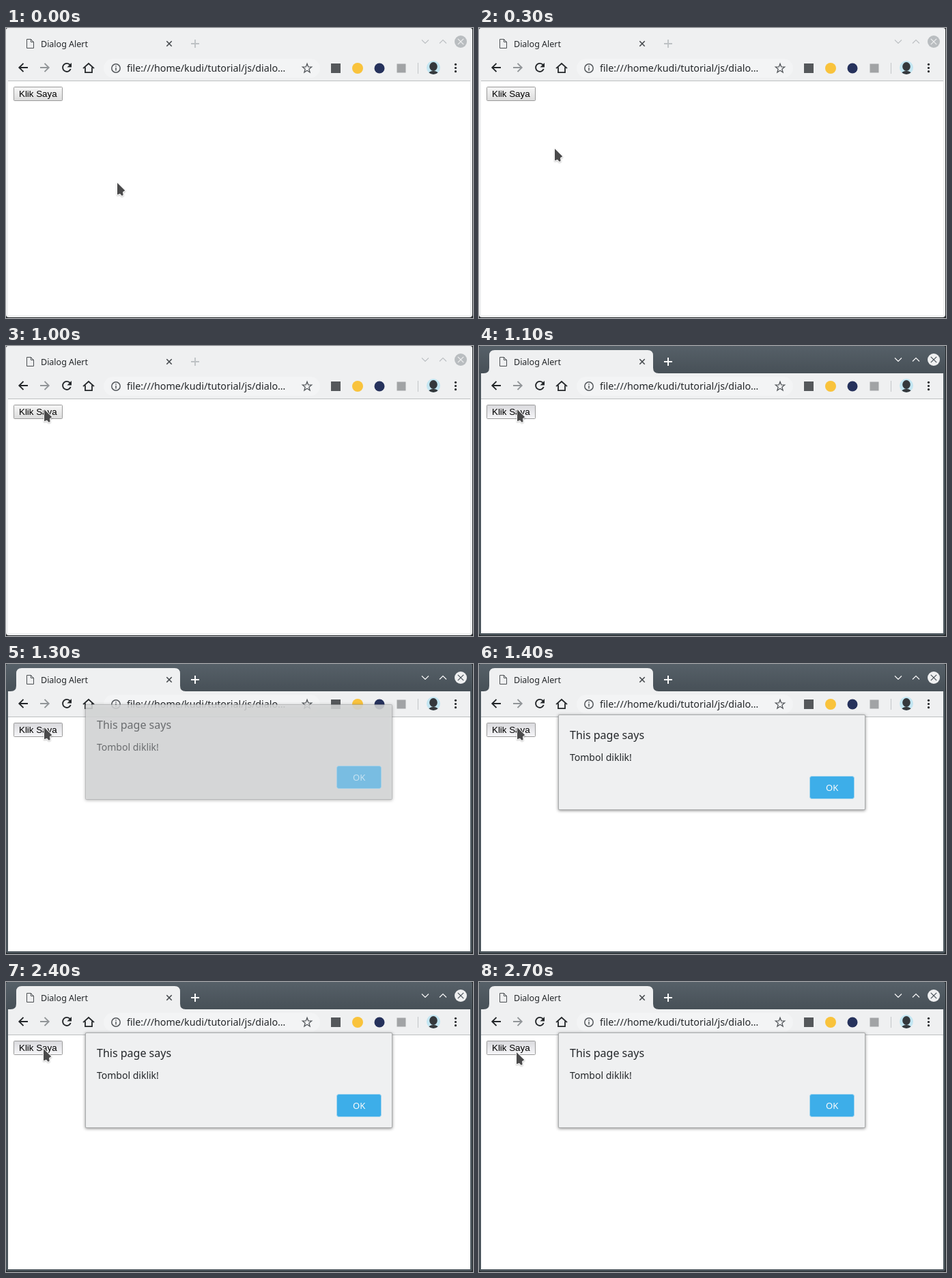
Animation of 684 by 425 pixels, one loop 2900 ms. Source, as an HTML page with a canvas:

```html
<!DOCTYPE html>
<html lang="id">
<head>
<meta charset="utf-8">
<title>Dialog Alert</title>
<style>
  html, body { margin: 0; width: 100%; height: 100%; overflow: hidden; background: #fff; }
  canvas { display: block; }
</style>
</head>
<body>
<canvas id="stage" width="684" height="425"></canvas>
<script>
const ctx = document.getElementById('stage').getContext('2d');
const LOOP = 2900, STEP = 100;
const SANS = '"Noto Sans", sans-serif';
const INK = '#232629', PANEL = '#eff0f1', GREY = '#54585c';

// time, x, y of the pointer tip
const PATH = [
  [0, 163, 227], [300, 111, 177], [600, 70, 128], [800, 59, 105], [1000, 56, 93],
  [2000, 56, 93], [2100, 57, 93], [2200, 60, 94], [2400, 55, 98], [2600, 55, 98], [2700, 55, 103]
];

function pointerAt(t) {
  const i = PATH.findIndex(p => p[0] > t);
  if (i < 0) return PATH[PATH.length - 1].slice(1);
  const [t0, x0, y0] = PATH[i - 1], [t1, x1, y1] = PATH[i];
  const k = (t - t0) / (t1 - t0);
  return [Math.round(x0 + (x1 - x0) * k), Math.round(y0 + (y1 - y0) * k)];
}

function rect(x, y, w, h, fill) {
  ctx.fillStyle = fill;
  ctx.fillRect(x, y, w, h);
}

function round(x, y, w, h, r, fill, stroke) {
  ctx.beginPath();
  ctx.roundRect(x, y, w, h, r);
  if (fill) { ctx.fillStyle = fill; ctx.fill(); }
  if (stroke) { ctx.strokeStyle = stroke; ctx.lineWidth = 1; ctx.stroke(); }
}

function disc(x, y, r, fill) {
  ctx.beginPath();
  ctx.arc(x, y, r, 0, Math.PI * 2);
  ctx.fillStyle = fill;
  ctx.fill();
}

function line(color, width, ...parts) {
  ctx.strokeStyle = color;
  ctx.lineWidth = width;
  ctx.stroke(new Path2D(parts.join(' ')));
}

function text(str, x, y, size, color = INK, font = SANS) {
  ctx.font = `${size}px ${font}`;
  ctx.fillStyle = color;
  ctx.fillText(str, x, y);
}

function gradient(y0, y1, a, b) {
  const g = ctx.createLinearGradient(0, y0, 0, y1);
  g.addColorStop(0, a);
  g.addColorStop(1, b);
  return g;
}

function cross(x, y, r, color, width) {
  line(color, width, `M${x - r} ${y - r}L${x + r} ${y + r}M${x + r} ${y - r}L${x - r} ${y + r}`);
}

function drawFrame(active) {
  rect(0, 0, 684, 425, '#25292c');
  round(0, 0, 683, 424, [3, 3, 4, 4], active ? '#4a545b' : PANEL);
  if (active) round(0, 0, 683, 40, [3, 3, 0, 0], gradient(0, 40, '#566068', '#475057'));
  rect(3, 40, 677, 37, PANEL);
  rect(3, 77, 677, 1, '#bcbfc1');
  rect(3, 78, 677, 343, '#fff');

  if (active) {
    ctx.fillStyle = PANEL;
    ctx.fill(new Path2D('M7 40Q15 40 15 32V14Q15 6 23 6H247Q255 6 255 14V32Q255 40 263 40Z'));
  }

  const control = active ? '#fcfcfc' : '#bdc1c4';
  line(control, active ? 2 : 1.8, 'M271 23H283M277 17V29');
  line(control, 1.1, 'M609 17.5L614 22.5L619 17.5M635 22.5L640 17.5L645 22.5');
  disc(666, 20, 9, active ? PANEL : '#b9bdc0');
  cross(666, 20, 4.2, active ? '#475057' : PANEL, 1.2);

  line('#4b4f52', 1, 'M30.5 16.5H36.5L40.5 20.5V29.5H30.5ZM36.5 16.5V20.5H40.5');
  text('Dialog Alert', 51, 28, 12.5);
  cross(239, 23, 3.7, '#45494d', 1.6);
}

function star(x, y, r) {
  const pts = [];
  for (let i = 0; i < 10; i++) {
    const a = i * Math.PI / 5 - Math.PI / 2, d = i % 2 ? r * 0.42 : r;
    pts.push(`${x + d * Math.cos(a)} ${y + d * Math.sin(a)}`);
  }
  line(GREY, 1.3, 'M' + pts.join('L') + 'Z');
}

function drawToolbar() {
  line(INK, 1.9, 'M32 58H19.5M25.5 51.8L19.3 58L25.5 64.2');
  line('#919598', 1.9, 'M50 58H62.5M56.5 51.8L62.7 58L56.5 64.2');
  line(INK, 1.9, 'M93.8 54.2A6 6 0 1 0 94.7 60');
  ctx.fillStyle = INK;
  ctx.fill(new Path2D('M96 51V57.5H89.5Z'));
  line(INK, 1.8, 'M113 59.2L121 52L129 59.2M116 57.5V65.2H126V57.5');

  round(143, 45, 317, 28, 14, '#f3f4f5');
  line(GREY, 1.5, 'M154.8 59A6.2 6.2 0 1 1 167.2 59A6.2 6.2 0 1 1 154.8 59M161 58V62.4M161 55.2V56.8');
  text('file:///home/kudi/tutorial/js/dialo…', 177, 64, 14.25);
  star(441, 59.3, 7);

  rect(476, 52, 14, 14, '#55585b');
  disc(515, 59, 8, '#f9c33c');
  disc(547, 59, 7.5, '#26325c');
  rect(572.5, 52.5, 13, 13, '#a1a3a5');
  rect(603, 51, 1, 16, '#c3c6c8');

  ctx.save();
  disc(626, 58, 10, '#c3e6f2');
  ctx.clip();
  ctx.beginPath();
  ctx.ellipse(626, 56.5, 5.8, 6.5, 0, 0, Math.PI * 2);
  ctx.ellipse(626, 68, 8, 5, 0, 0, Math.PI * 2);
  ctx.fillStyle = '#34383c';
  ctx.fill();
  ctx.restore();

  for (const y of [53.3, 58.5, 63.7]) disc(658.5, y, 1.6, INK);
}

function drawButton(pressed) {
  const fill = pressed ? gradient(87, 106, '#dadade', '#f6f6f8') : gradient(87, 106, '#f6f6f6', '#dddddd');
  round(11.5, 86.5, 71, 20, 1, fill, '#9a9a9a');
  text('Klik Saya', 19, 101, 13.333, '#000', '"Liberation Sans", Arial, sans-serif');
}

function drawDialog(dy, alpha) {
  ctx.save();
  ctx.translate(0, dy);
  ctx.globalAlpha = alpha;
  ctx.save();
  ctx.shadowColor = 'rgba(0,0,0,.45)';
  ctx.shadowBlur = 4;
  ctx.shadowOffsetY = 1;
  round(116, 74, 450, 140, 2, '#a9abac');
  ctx.restore();
  round(117, 75, 448, 138, 1, PANEL);
  text('This page says', 133, 110, 16);
  text('Tombol diklik!', 133, 142, 14);
  round(484.5, 164.5, 65, 33, 3, '#3daee9', '#a5d6ee');
  text('OK', 508, 186, 13, '#fcfcfc');
  ctx.restore();
}

function drawPointer(x, y) {
  const shape = new Path2D('M0 0L11.3 11.3L8 13.2L8.6 18L6.6 18.8L4 15.8L0 17.2Z');
  ctx.save();
  ctx.translate(x, y);
  ctx.lineJoin = 'round';
  ctx.shadowColor = 'rgba(0,0,0,.25)';
  ctx.shadowBlur = 2;
  ctx.shadowOffsetY = 1;
  ctx.strokeStyle = '#fcfcfc';
  ctx.lineWidth = 2;
  ctx.stroke(shape);
  ctx.shadowColor = 'transparent';
  ctx.fillStyle = '#4a4a4b';
  ctx.fill(shape);
  ctx.restore();
}

function draw(now) {
  const t = Math.floor((now % LOOP) / STEP) * STEP;
  const active = t >= 1100;
  drawFrame(active);
  drawToolbar();
  drawButton(active);
  if (t >= 1400) drawDialog(0, 1);
  else if (t >= 1300) drawDialog(-15, 0.6);
  drawPointer(...pointerAt(t));
  requestAnimationFrame(draw);
}

requestAnimationFrame(draw);
</script>
</body>
</html>
```
